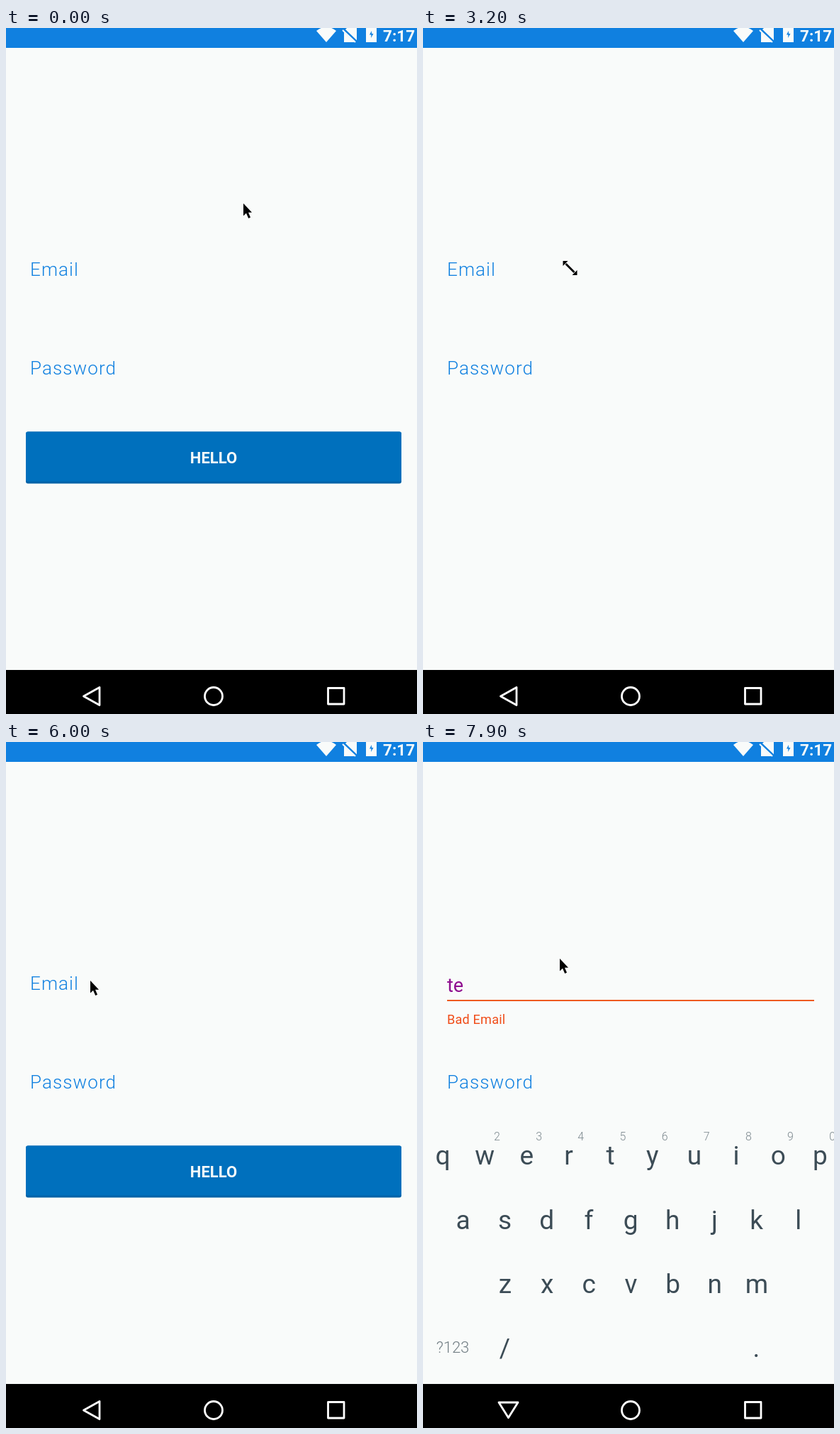
An HTML page for the animation above (8000 ms loop, 580x966 px).

```html
<!DOCTYPE html>
<html lang="en">
<head>
<meta charset="utf-8">
<title>Login form</title>
<style>
  html, body { margin: 0; width: 100%; height: 100%; overflow: hidden; background: #f9fbfa; }
  svg { display: block; width: 580px; height: 966px; font-family: Roboto, sans-serif; }
  .label { font-size: 26px; font-weight: 300; letter-spacing: 1.1px; fill: #1080e0; }
  .keys { font-size: 37px; text-anchor: middle; fill: #3c4c56; }
  .digits { font-size: 16px; font-weight: 300; fill: #7d898f; }
  .fading .keys { font-weight: 300; fill: #717d83; }
  .fading .over { font-weight: 500; fill: #255878; }
  .fading .digits { font-weight: 400; fill: #5d8099; }
</style>
</head>
<body>
<svg viewBox="0 0 580 966">
  <defs>
    <clipPath id="buttonArea"><rect x="28" y="500" width="529" height="200"/></clipPath>
    <clipPath id="navArea"><rect y="905" width="580" height="61"/></clipPath>
  </defs>
  <rect width="580" height="966" fill="#f9fbfa"/>

  <rect width="580" height="28" fill="#1080e0"/>
  <g fill="#f9fbfa">
    <path d="M438 4Q452 -7 466 4L452 20Z"/>
    <path d="M481 0H495V20H477V4Z"/>
    <path d="M474 0L497 22" stroke="#1080e0" stroke-width="4"/>
    <path d="M475 3L493 20" stroke="#f9fbfa" stroke-width="2"/>
    <rect x="508" width="15" height="20"/>
    <path d="M516 4L513 9.500H515.500L515 14L518.500 8H516Z" fill="#1080e0"/>
    <text x="532" y="18.500" font-size="22.500" font-weight="700">7:17</text>
  </g>

  <text id="emailLabel" class="label" x="34" y="349">Email</text>
  <text class="label" x="34" y="488">Password</text>
  <g id="entry">
    <text id="typed" x="34" y="352" font-size="27" fill="#8f0f8f"></text>
    <rect x="34" y="363" width="518" height="2" fill="#ee5a20"/>
    <text x="34" y="397" font-size="18" letter-spacing=".25" fill="#f04c18">Bad Email</text>
  </g>

  <g id="button">
    <rect x="28" y="568.500" width="530" height="73" rx="3" fill="#0063a8"/>
    <rect x="28" y="568.500" width="530" height="70" rx="3" fill="#0070bd"/>
    <text x="293" y="613" font-size="22" font-weight="700" text-anchor="middle" fill="#f9fbfa">HELLO</text>
  </g>

  <rect y="904" width="580" height="62" fill="#000"/>
  <g fill="none" stroke="#fff" stroke-width="2.800" stroke-linejoin="round">
    <path id="back"/>
    <circle cx="293" cy="941" r="12.500"/>
    <rect x="454.500" y="929.500" width="22.500" height="22.500"/>
  </g>

  <g id="keyboard">
    <rect y="535" width="580" height="368" fill="#f9fbfa"/>
    <g id="rows" class="keys"></g>
    <g id="overlay" class="keys over" clip-path="url(#buttonArea)"></g>
    <g id="digits" class="keys digits"></g>
    <text id="symbols" x="42" y="860" font-size="22" font-weight="300" text-anchor="middle" fill="#717d83">?123</text>
  </g>
  <g id="enter" clip-path="url(#navArea)"><circle cx="544.500" cy="892" r="24.700" fill="#388488"/></g>

  <path id="arrow" d="M0 0V17.500L4 13.700L7.200 21L10 19.700L7 12.700H12Z"/>
  <path id="resize" d="M-10 -10H-3L-10 -3ZM10 10H3L10 3ZM-7 -5L-5 -7L7 5L5 7Z"/>
</svg>
<script>
const $ = id => document.getElementById(id);
const show = (id, on) => $(id).setAttribute('visibility', on ? 'visible' : 'hidden');
const LOOP = 8000, PITCH = 59.15, SLIDE = 78;

const row = (chars, x, y) => [...chars].map((c, i) =>
  c === ' ' ? '' : `<text x="${x + i * PITCH}" y="${y}">${c}</text>`).join('');

$('rows').innerHTML = row('qwertyuiop', 28, 595) + row('asdfghjkl', 56.5, 685.5) +
  row('zxcvbnm', 116, 776) + row('/     .', 115.5, 866);
$('overlay').innerHTML = row('qwertyuiop', 28, 595);
$('digits').innerHTML = row('234567890', 104.5, 561);

// Pointer track: time, x, y
const track = [
  [0, 335, 247], [2100, 335, 247], [2700, 212, 331], [3200, 207.5, 338],
  [3500, 196.5, 343.5], [4100, 194.5, 343.5], [4400, 190, 343], [4900, 128, 346],
  [5400, 119, 336], [6400, 119, 336], [7200, 193, 305], [LOOP, 193, 305]
];

function pointer(t) {
  const i = track.findIndex(k => k[0] > t);
  const [t0, x0, y0] = track[i - 1], [t1, x1, y1] = track[i];
  const p = (t - t0) / (t1 - t0), e = p * p * (3 - 2 * p);
  return [x0 + (x1 - x0) * e, y0 + (y1 - y0) * e];
}

function draw(now) {
  const t = Math.floor(now % LOOP / 100) * 100; // ten steps per second
  const open = t >= 6200, sliding = open && t < 6300, resizing = t >= 2500 && t < 4500;
  const lift = SLIDE * Math.max(0, 1 - (t - 6100) / 200);

  show('button', t < 2400 || t >= 3900);
  show('emailLabel', t < 6100);
  show('entry', t >= 7300);
  $('typed').textContent = t < 7500 ? 't' : 'te';

  show('keyboard', open);
  show('overlay', sliding);
  show('enter', sliding);
  show('symbols', open && !sliding);
  $('keyboard').setAttribute('class', sliding ? 'fading' : '');
  $('keyboard').setAttribute('transform', `translate(0 ${open ? lift : 0})`);
  $('back').setAttribute('d', open ? 'M107 930H134L120.5 951.5Z' : 'M109.500 941L132 928.500V953.500Z');

  show('arrow', !resizing);
  show('resize', resizing);
  $(resizing ? 'resize' : 'arrow').setAttribute('transform', `translate(${pointer(t)})`);
}

function tick(now) {
  draw(now);
  requestAnimationFrame(tick);
}
draw(0);
requestAnimationFrame(tick);
</script>
</body>
</html>
```
